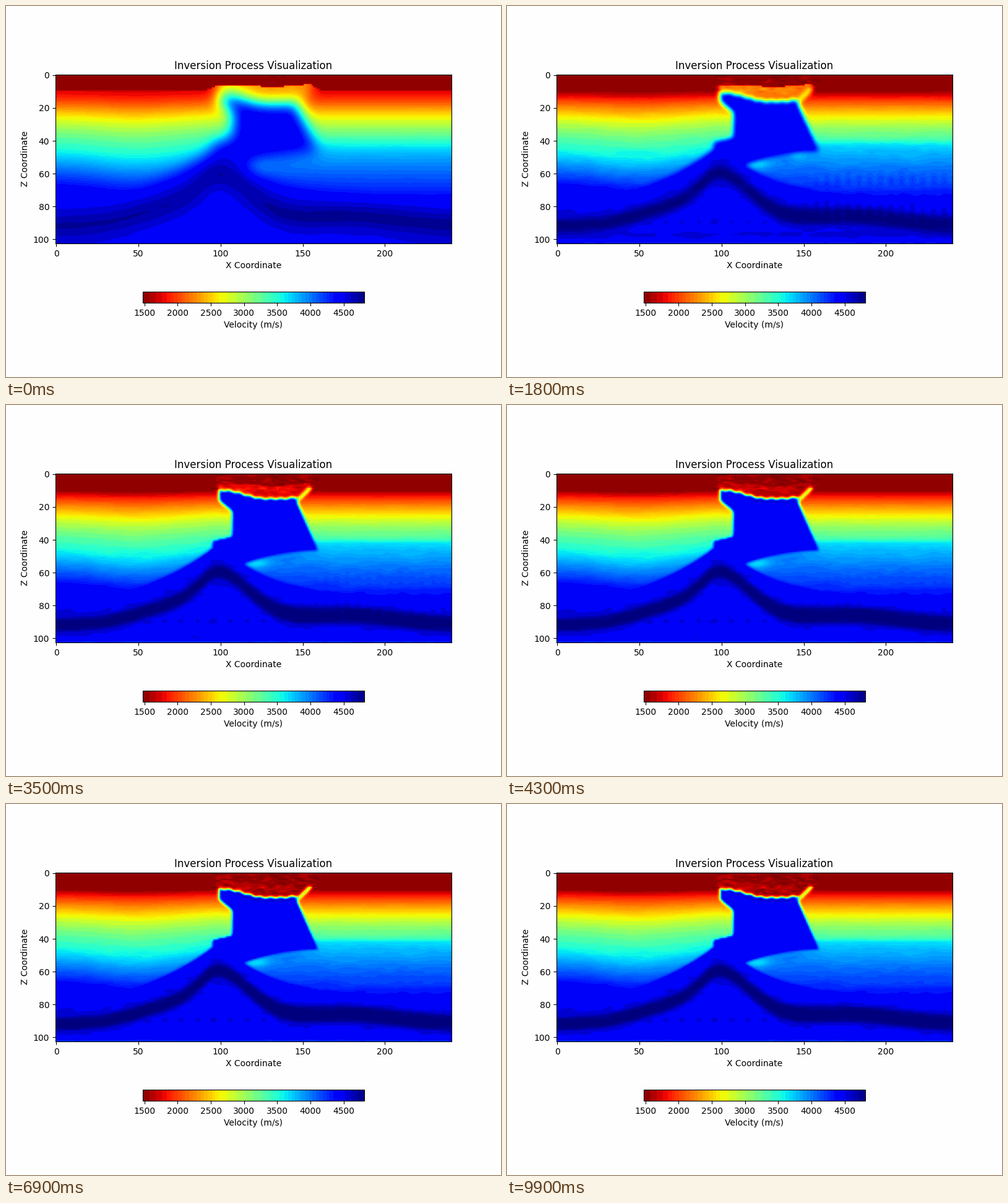
Write a matplotlib script that moves like this. It is 800 by 600 pixels and loops after 10000 ms.

```python
import numpy as np
import matplotlib.pyplot as plt
from matplotlib.animation import FuncAnimation
from matplotlib.colors import ListedColormap

NX, NZ, FRAMES = 241, 103, 100
VMIN, VMAX = 1472, 4812
WATER, FAST = 1500, 4485
rng = np.random.default_rng(7)
X, Z = np.meshgrid(np.arange(NX, dtype=float), np.arange(NZ, dtype=float))


def kernel(n, sigma):
    i = np.arange(n)
    k = np.exp(-0.5 * ((i[:, None] - i) / sigma) ** 2)
    return k / k.sum(axis=1, keepdims=True)


def blur(a, sx, sz=None):
    return kernel(NZ, sz or sx) @ a @ kernel(NX, sx).T


def noise(sx, sz):
    n = blur(rng.standard_normal((NZ, NX)), sx, sz)
    return n / n.std()


def bell(a, mid, width):
    return np.exp(-((a - mid) / width) ** 2)


def blob(x, z, rx, rz):
    return bell(X, x, rx) * bell(Z, z, rz)


def ramp(a, lo, hi):
    return np.clip((a - lo) / (hi - lo), 0, 1)


def smooth(a, lo, hi):
    t = ramp(a, lo, hi)
    return t * t * (3 - 2 * t)


def window(a, lo, hi, soft):
    return smooth(a, lo - soft, lo + soft) * (1 - smooth(a, hi - soft, hi + soft))


def side(distance):
    """Coverage of a cell on the positive side of an edge."""
    return np.clip(distance + 0.5, 0, 1)


def banded_jet():
    """Reversed jet merged into coarse colour cells."""
    rgb = plt.get_cmap('jet_r')(np.linspace(0, 1, 256))[:, :3]
    cells = (rgb * 255).astype(int) // [32, 16, 32]
    out = rgb.copy()
    for c in np.unique(cells, axis=0):
        same = (cells == c).all(axis=1)
        out[same] = rgb[same].mean(axis=0)
    return ListedColormap(out)


def compaction(depth):
    """Speed of sediment at a depth below the sea floor."""
    d = np.maximum(depth - 10.5, 0)
    return 1490 + 153 * d ** 0.73 + 90 * bell(d, 22, 9)


# Sediments: a sagging basin on the left, a harder step on the right
sag = 4.2 * bell(X, 48, 28) - 1.6 * bell(X, 97, 12)
left = compaction(Z - sag * ramp(Z, 8, 50))
left += 90 * blob(46, 47, 11, 1.3) - 130 * blob(15, 74, 24, 1.6)
right = compaction(Z) + smooth(Z, 39.5, 42) * (270 - 17 * (Z - 41))
right += 150 * blob(140, 48, 14, 5) - 300 * blob(122, 54.6, 8, 2.8)
right -= 60 * bell(Z, 67, 1.8) * ramp(X, 165, 185)
sediment = np.minimum(left + (right - left) * smooth(X, 108, 118), FAST)

# Edges of the salt body and of the basement it grows from
deep = np.maximum(Z - 45, 0)
salt_left = (99 + 8 * smooth(Z, 15, 24) - 12 * smooth(Z, 37.5, 41.5)
             - 1.2 * deep - 0.025 * deep ** 2)
salt_right = 147 + 12 * ramp(Z, 18, 46)
salt_top = 9.8 + 5.2 * smooth(X, 101, 128) - 1.0 * smooth(X, 138, 148) + 0.4 * np.sin(X)
salt_base = 46.7 + 8 * ((159 - X) / 45) ** 2
flank = 54.6 + 22 * (1 - np.exp(-np.maximum(X - 114, 0) / 32))
outside = np.maximum(side(X - salt_right), side(Z - salt_base) * side(X - 114))
body = side(X - salt_left) * (1 - outside * side(flank - Z))
horn = side(1.3 - np.abs(X - 148 - 1.05 * (15 - Z))) * window(Z, 8.5, 16, 0.5)
cover = (X > 98.5) & (X < 155) & (Z < 15 - 0.9 * np.maximum(X - 147, 0))

# Folded layer
fold_mid = (92 - 15 * bell(X, 85, 40) - 6 * bell(X, 175, 45)
            - 19 * bell(X, 100, np.where(X < 100, 16, 26)))
off = np.abs(Z - fold_mid)
fold = (290 / (1 + np.exp((off - 3.9 - 0.9 * ramp(X, 110, 135)) / 0.5))
        + 60 * bell(off, 0, 8))

# Water layer
floor = (9.6 - 3 * window(X, 94, 158, 5) + 0.7 * window(X, 124, 139, 1)
         - 1.6 * bell(X, 153.5, 3))
water = Z < floor
weight = np.where(water, 1e-3, 1.0)

# Fine structure that appears while the model converges
s = Z - salt_top - 1.5
streaks = 150 * np.cos(1.05 * s) * bell(s, 0, 5) * window(X, 108, 144, 3)
dots = sum(130 * blob(x, 89.5, 1.3, 0.9) for x in range(56, 156, 10))
edge = -230.0 * (Z == NZ - 1)
patches = (-330 * blob(146.5, 49.3, 5, 3) - 230 * blob(2, 74.5, 6, 3)
           - 180 * blob(130, 24, 18, 7) + 150 * blob(45, 47, 13, 1.6)
           + 90 * bell(Z, 97, 2))
wobble = np.sin(2 * np.pi * X / 6.5) * ramp(X, 145, 165) * (
    bell(Z, 64, 4) + bell(Z, 82, 7))
grain_a, grain_b = noise(3.2, 1.0), noise(2.6, 0.8)
speckle = noise(1.6, 0.5)
above_salt = window(X, 96, 158, 7) * (1 - ramp(Z, 9, 14))
beads = 95 * (X % 2) * (Z == 1) * window(X, 88, 178, 4)
grain_mask = 0.25 + 0.75 * ramp(Z, 9, 40)


def velocity(f):
    detail = 1 - np.exp(-f / 15)
    early = f / 10 * np.exp(1 - f / 10)
    sigma = 0.65 + 3.55 * np.exp(-f / 11)
    lag = 1.8 * bell(f, 0, 22)
    lid = 1560 + 740 / (1 + np.exp((f - 28) / 6))

    fast = body * side(Z - salt_top - lag)
    v = np.where(cover, lid, sediment)
    v = v + (FAST - v) * fast
    v = v + (3150 - v) * horn + fold
    v = v + detail ** 2 * streaks * fast
    v = blur(v * weight, sigma) / blur(weight, sigma)
    v[water] = WATER

    grain = grain_a * (1 - detail) + grain_b * detail
    v += (3 + 9 * detail + 10 * early) * grain * grain_mask
    v += (10 + 60 * detail) * speckle * above_salt
    v += 45 * detail * above_salt
    v += (40 * early + 5 * detail) * wobble
    v += early ** 3 * patches
    v += detail * (dots + edge) + detail ** 3 * beads
    return v


fig = plt.figure(figsize=(8, 6), dpi=100, facecolor='#fefefe')
ax = fig.add_axes([0.1, 215.94 / 600, 0.8, 273.53 / 600])
image = ax.imshow(velocity(0), cmap=banded_jet(), vmin=VMIN, vmax=VMAX, aspect='auto')
ax.set_title('Inversion Process Visualization')
ax.set_xlabel('X Coordinate')
ax.set_ylabel('Z Coordinate')
ax.set_xticks(range(0, 201, 50))
ax.set_yticks(range(0, 101, 20))
cax = fig.add_axes([0.276, 120.1 / 600, 0.448, 17.92 / 600])
fig.colorbar(image, cax=cax, orientation='horizontal', label='Velocity (m/s)',
             ticks=range(1500, 4501, 500))


def update(f):
    image.set_data(velocity(f))
    return [image]


anim = FuncAnimation(fig, update, frames=FRAMES, interval=100, repeat=True,
                     repeat_delay=0, blit=False)
plt.show()
```
